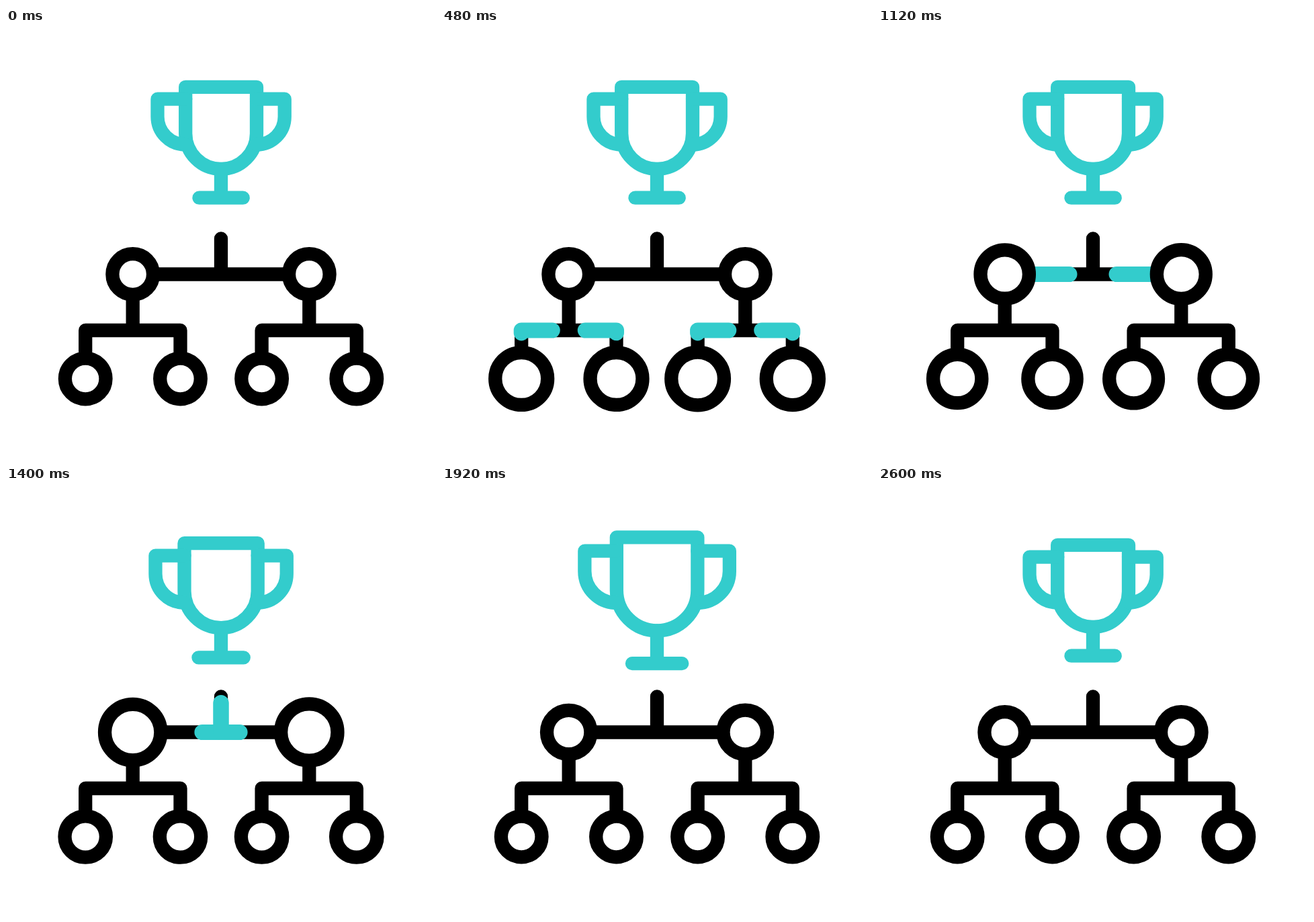
Recreate the animation shown at these times as an HTML page. Size 640 by 640 pixels, loop 3000 ms.

```html
<!DOCTYPE html>
<html lang="en">
<head>
<meta charset="utf-8">
<title>Tournament bracket</title>
<style>
  html, body { margin: 0; width: 100%; height: 100%; overflow: hidden; background: #fff; }
  svg { display: block; width: 100%; height: 100%; }
  path, circle { fill: none; stroke: #000; stroke-width: 20.3; stroke-linecap: round; stroke-linejoin: round; }
  circle { fill: #fff; }
  #pulses path { stroke: #33cccc; stroke-width: 23; }
  #cup path { stroke: #33cccc; vector-effect: non-scaling-stroke; }
</style>
</head>
<body>
<svg viewBox="0 0 640 640">
  <g id="lines">
    <path d="M320 313.5V366.5M188.7 366.5H451.3"/>
    <path d="M118.2 500V450H259.5V500M188.7 366.5V450"/>
    <path d="M380.6 500V450H521.8V500M451.3 366.5V450"/>
  </g>
  <g id="pulses"></g>
  <g id="nodes"></g>
  <g id="cup">
    <path d="M267.2 87.8H373V157a52.9 52.9 0 0 1 -105.8 0Z"/>
    <path d="M267.2 105.7H225.5V132a41.5 41.5 0 0 0 41.5 41.5"/>
    <path d="M373 105.7H414.7V132a41.5 41.5 0 0 1 -41.5 41.5"/>
    <path d="M320 210V252.7M287.5 252.7H352.7"/>
  </g>
</svg>
<script>
const LOOP = 3000, STEP = 40, RADIUS = 30.3;
const $ = id => document.getElementById(id);

function add(parent, tag, attrs) {
  const el = document.createElementNS('http://www.w3.org/2000/svg', tag);
  for (const k in attrs) el.setAttribute(k, attrs[k]);
  return parent.appendChild(el);
}

const ease = (t, from, to) => {
  const u = Math.min(1, Math.max(0, (t - from) / (to - from)));
  return u * u * (3 - 2 * u);
};
const swell = (t, [a, b, c, d]) => ease(t, a, b) - ease(t, c, d);

const LEAF = [40, 700, 760, 1480];
const MID = [790, 1440, 1440, 2120];
const CUP = [1200, 1840, 1920, 2600];

const nodes = [
  [118.2, 522, 11.7, LEAF], [259.5, 522, 11.7, LEAF],
  [380.6, 522, 12.2, LEAF], [521.8, 522, 11.8, LEAF],
  [188.7, 366.5, 11.5, MID], [451.3, 366.5, 12, MID]
].map(([cx, cy, grow, times]) => ({ el: add($('nodes'), 'circle', { cx, cy, r: RADIUS }), grow, times }));

// Each pulse runs along its path: head times, then tail times.
const LOW = [40, 872, 155, 1155];
const HIGH = [708, 1508, 968, 1768];
const pulses = [
  ['M118.2 496V450H188.7V397', LOW], ['M259.5 496V450H188.7V397', LOW],
  ['M380.6 496V450H451.3V397', LOW], ['M521.8 496V450H451.3V397', LOW],
  ['M188.7 366.5H320V313.5', HIGH], ['M451.3 366.5H320V313.5', HIGH]
].map(([d, times]) => {
  const el = add($('pulses'), 'path', { d });
  return { el, times, length: el.getTotalLength() };
});

function draw(t) {
  for (const n of nodes) n.el.setAttribute('r', RADIUS + n.grow * swell(t, n.times));

  for (const { el, times: [a, b, c, d], length } of pulses) {
    const head = length * ease(t, a, b), tail = length * ease(t, c, d);
    const size = head - tail;
    el.setAttribute('visibility', size > 0.5 ? 'visible' : 'hidden');
    el.setAttribute('stroke-dasharray', `${Math.max(size, 0.01)} 1000`);
    el.setAttribute('stroke-dashoffset', -tail);
  }

  const s = 1 + 0.139 * swell(t, CUP);
  $('cup').setAttribute('transform', `translate(320 170.3) scale(${s}) translate(-320 -170.3)`);
}

const start = performance.now();
function tick() {
  const t = (performance.now() - start) % LOOP;
  draw(Math.floor(t / STEP) * STEP);
  requestAnimationFrame(tick);
}
tick();
</script>
</body>
</html>
```
